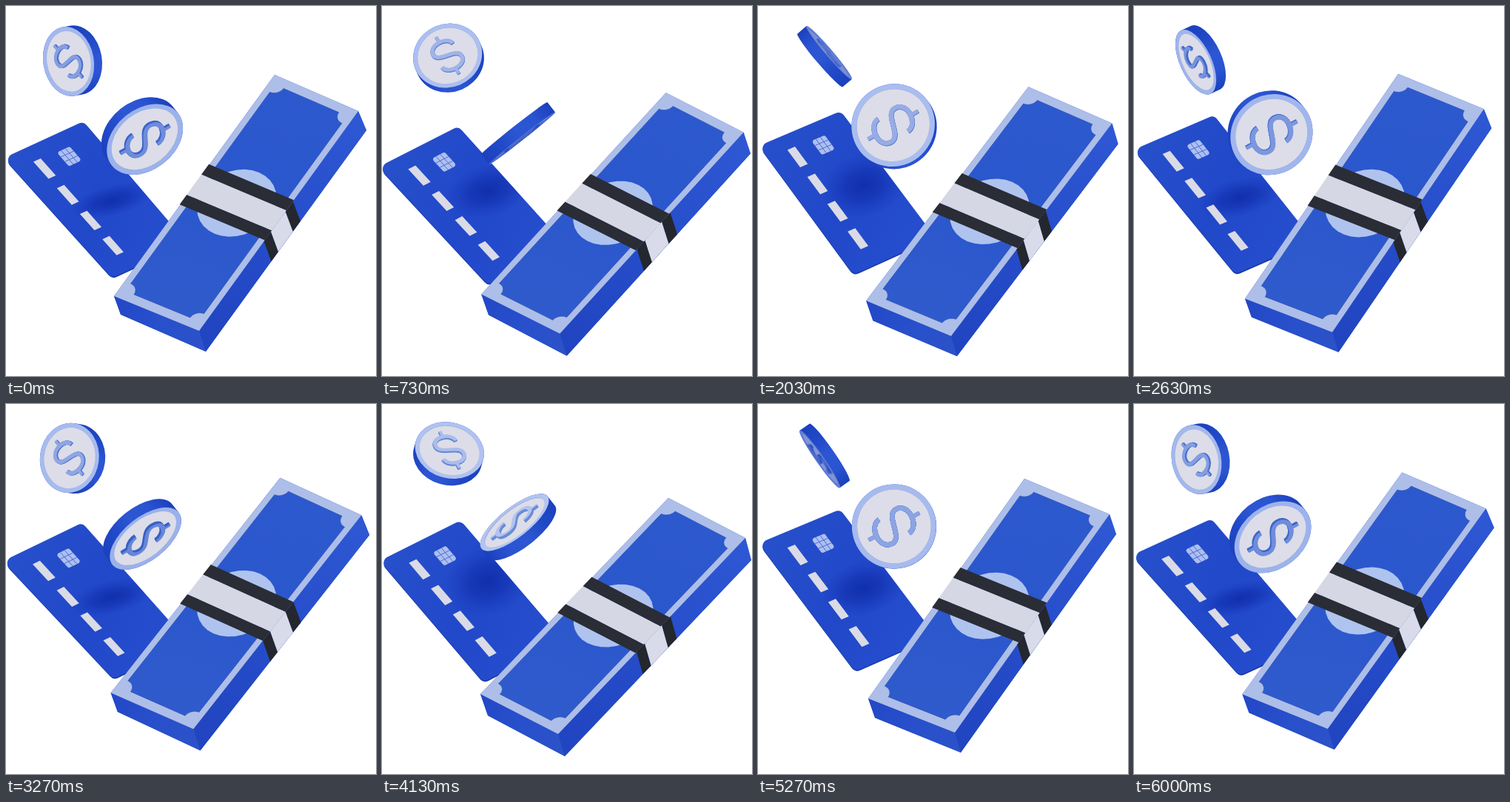
Animation of 500 by 500 pixels, one loop 6030 ms. Source, as an HTML page with a canvas:

```html
<!DOCTYPE html>
<html lang="en">
<head>
<meta charset="utf-8">
<title>Cash, card and coins</title>
<style>
  html, body { margin: 0; width: 100%; height: 100%; overflow: hidden; background: #fff; }
  canvas { display: block; width: 500px; height: 500px; }
</style>
</head>
<body>
<canvas id="stage" width="500" height="500"></canvas>
<script>
const ctx = document.getElementById('stage').getContext('2d');
const LOOP = 6030;
const HALF = LOOP / 2;
const TAU = Math.PI * 2;
const RAD = Math.PI / 180;

// Three poses of the sway; every other pose is a first-harmonic blend of them.
const POSE_AT = [0, 1115, 2255].map(ms => ms / HALF * TAU);

// Corner order: top, right, bottom, left, then the lower right, bottom, left.
const BILL = [
  [[363, 93], [476, 142], [261, 439], [146, 392], [487, 168], [270, 467], [155, 417]],
  [[387, 127], [491, 181], [238, 446], [133, 392], [499, 211], [247, 476], [143, 421]],
  [[360, 101], [475, 149], [266, 444], [149, 398], [484, 176], [274, 471], [158, 424]]
];
// Corner order: left, top, right, bottom.
const CARD = [
  [[-3, 206], [104.5, 156.5], [245, 321], [143, 368]],
  [[-3, 212.5], [106, 158], [245, 320], [137, 376.5]],
  [[1, 189], [111, 143], [240, 314], [131, 362]]
];

const COINS = [
  { x: 90, y: 70, bob: 4, lag: 0, R: 47.2, h: 16, axis: [.56, .72, .41],
    start: 37.5, dir: -1, roll: a => .07 - .2 * a },
  { x: 184, y: 168.7, bob: 7.5, lag: .42, R: 57, h: 17, axis: [.785, -.62, 0],
    start: 44, dir: 1, roll: a => .18 + .06 * a }
];

const DOLLAR = new Path2D(
  'M.31-.24C.28-.55-.34-.57-.34-.23C-.34.07.34-.07.34.23C.34.57-.28.55-.31.24');
const BAR = new Path2D('M0-.68V-.42M0 .42V.68');

function weights(angle) {
  return POSE_AT.map((own, i) => POSE_AT.reduce((w, other, j) =>
    i === j ? w : w * Math.sin((angle - other) / 2) / Math.sin((own - other) / 2), 1));
}

function blend(poses, w) {
  return poses[0].map((_, i) => [0, 1].map(k =>
    poses.reduce((sum, pose, n) => sum + w[n] * pose[i][k], 0)));
}

// Projective map from the unit square onto a quad.
function project([p0, p1, p2, p3]) {
  const dx1 = p1[0] - p2[0], dy1 = p1[1] - p2[1];
  const dx2 = p3[0] - p2[0], dy2 = p3[1] - p2[1];
  const sx = p0[0] - p1[0] + p2[0] - p3[0];
  const sy = p0[1] - p1[1] + p2[1] - p3[1];
  const det = dx1 * dy2 - dx2 * dy1;
  const g = (sx * dy2 - dx2 * sy) / det;
  const h = (dx1 * sy - sx * dy1) / det;
  return (u, v) => {
    const w = 1 + g * u + h * v;
    return [0, 1].map(k => (p0[k] + (p1[k] * (1 + g) - p0[k]) * u
      + (p3[k] * (1 + h) - p0[k]) * v) / w);
  };
}

function poly(points, fill) {
  ctx.beginPath();
  points.forEach(p => ctx.lineTo(p[0], p[1]));
  ctx.closePath();
  ctx.fillStyle = fill;
  ctx.fill();
}

function rect(map, u0, v0, u1, v1, fill) {
  poly([map(u0, v0), map(u1, v0), map(u1, v1), map(u0, v1)], fill);
}

function arc(map, u, v, ru, rv, from, to) {
  return Array.from({ length: 33 }, (_, i) => {
    const a = from + (to - from) * i / 32;
    return map(u + ru * Math.cos(a), v + rv * Math.sin(a));
  });
}

function gradient(from, to, colors) {
  const g = ctx.createLinearGradient(from[0], from[1], to[0], to[1]);
  colors.forEach((c, i) => g.addColorStop(i / (colors.length - 1), c));
  return g;
}

function roundedPath(points, r) {
  const n = points.length;
  const last = points[n - 1];
  ctx.beginPath();
  ctx.moveTo((last[0] + points[0][0]) / 2, (last[1] + points[0][1]) / 2);
  points.forEach((p, i) => ctx.arcTo(...p, ...points[(i + 1) % n], r));
  ctx.closePath();
}

function drawCard(w, angle) {
  const quad = blend(CARD, w);
  const map = project(quad);

  roundedPath(quad.map(p => [p[0] + .3, p[1] + 1]), 9);
  ctx.fillStyle = '#1a3aa8';
  ctx.fill();

  ctx.save();
  roundedPath(quad.map(p => [p[0], p[1] - .7]), 9);
  ctx.fillStyle = gradient(quad[0], quad[2], ['#2750cb', '#2148c9', '#264fce']);
  ctx.fill();
  ctx.clip();

  // Soft shadow of the large coin.
  ctx.translate(143, 249 + 14 * Math.cos(angle));
  ctx.rotate(-.25);
  ctx.scale(58, 36 - 15 * Math.cos(angle));
  const shade = ctx.createRadialGradient(0, 0, 0, 0, 0, 1);
  shade.addColorStop(0, 'rgba(12,40,165,.8)');
  shade.addColorStop(.45, 'rgba(14,44,170,.55)');
  shade.addColorStop(1, 'rgba(20,50,185,0)');
  ctx.fillStyle = shade;
  ctx.fillRect(-1, -1, 2, 2);
  ctx.restore();

  for (let i = 0; i < 4; i++) {
    const v = .095 + .213 * i;
    rect(map, .238, v, .33, v + .137, '#dadbe6');
  }

  const [u0, v0, u1, v1] = [.522, .103, .685, .214];
  roundedPath([map(u0, v0), map(u1, v0), map(u1, v1), map(u0, v1)], 3);
  ctx.fillStyle = '#adbff0';
  ctx.fill();
  ctx.beginPath();
  for (const s of [1 / 3, 2 / 3]) {
    const u = u0 + (u1 - u0) * s, v = v0 + (v1 - v0) * s;
    ctx.moveTo(...map(u, v0)); ctx.lineTo(...map(u, v1));
    ctx.moveTo(...map(u0, v)); ctx.lineTo(...map(u1, v));
  }
  ctx.strokeStyle = '#4a6bd0';
  ctx.lineWidth = 1;
  ctx.stroke();
}

function drawBill(w) {
  const [T, R, B, L, R2, B2, L2] = blend(BILL, w);
  const top = project([T, R, B, L]);
  const side = project([R, R2, B2, B]);

  poly([T, R, R2, B2, L2, L], '#2850ca');
  poly([L, B, B2, L2], gradient(L, B2, ['#2347c6', '#2850cb', '#2c52c8']));
  poly([R, R2, B2, B], gradient(R, B2, ['#2f58d4', '#264dca', '#2144c0']));
  poly([T, R, B, L], '#adbee8');

  // Panel with a scooped notch at each corner.
  const [pu, pv, ru, rv] = [.07, .034, .1, .033];
  const corners = [[pu, pv, 1], [1 - pu, pv, 2], [1 - pu, 1 - pv, 3], [pu, 1 - pv, 4]];
  const panel = corners.flatMap(([u, v, q]) =>
    arc(top, u, v, ru, rv, q * Math.PI / 2, (q - 1) * Math.PI / 2));
  poly(panel, gradient(T, B, ['#2d59ce', '#2b57cd', '#305bcc']));
  ctx.strokeStyle = '#2a4fb8';
  ctx.lineWidth = .8;
  ctx.stroke();
  poly(arc(top, .5, .5, .39, .139, 0, TAU), '#afc3ef');

  const bands = [[.406, .453, '#2a2d36', '#24272e'], [.544, .588, '#2a2d36', '#24272e'],
                 [.453, .544, '#d5d7e5', '#d9dbea']];
  for (const [from, to, face, edge] of bands) {
    rect(side, 0, from, 1, to, edge);
    rect(top, -.008, from, 1, to, face);
  }
}

function drawCoin(coin, phase, angle) {
  const { R, h, axis: a } = coin;
  const m = Math.hypot(a[0], a[1]);
  const e0 = [-a[2] * a[0] / m, -a[2] * a[1] / m, m];
  const e1 = [-a[1] / m, a[0] / m, 0];

  // Both faces are alike, so the visible one always lies within a half turn.
  const turn = coin.start + coin.dir * 180 * phase;
  const spin = ((turn + 90) % 180 + 180) % 180 - 90;
  const al = spin * RAD, c = Math.cos(al), s = Math.sin(al);
  const n = e0.map((v, k) => v * c + e1[k] * s);
  const b = e0.map((v, k) => e1[k] * c - v * s);
  const cx = coin.x, cy = coin.y + coin.bob * Math.cos(angle - coin.lag);
  const nz = Math.max(n[2], .01), tilt = Math.atan2(n[1], n[0]);
  const at = d => [cx + n[0] * d, cy + n[1] * d];
  const disc = (d, scale, fill) => {
    ctx.beginPath();
    ctx.ellipse(...at(d), R * nz * scale, R * scale, tilt, 0, TAU);
    ctx.fillStyle = fill;
    ctx.fill();
  };
  // Faces turned upwards catch more light.
  const up = .5 - n[1] / 2;
  const lit = ranges => `rgb(${ranges.map(([lo, hi]) => lo + (hi - lo) * up)})`;

  // Edge of the cylinder.
  const mx = -Math.sin(tilt) * R, my = Math.cos(tilt) * R;
  ctx.beginPath();
  ctx.ellipse(...at(-h / 2), R * nz, R, tilt, Math.PI / 2, Math.PI * 1.5);
  ctx.ellipse(...at(h / 2), R * nz, R, tilt, -Math.PI / 2, Math.PI / 2);
  ctx.closePath();
  ctx.fillStyle = gradient([cx + mx, cy + my], [cx - mx, cy - my],
    ['#1b41bd', '#2149c8', '#2c56d2', '#2b54d2', '#1b40bc']);
  ctx.fill();

  disc(h / 2, 1, lit([[148, 184], [172, 200], [234, 242]]));
  disc(h / 2, .875, '#9db0e2');
  ctx.save();
  ctx.clip();
  disc(h / 2 - R * .025, .875, '#dcdde8');

  // Raised symbol, stacked from its base to its top.
  const roll = coin.roll(al), cr = Math.cos(roll), sr = Math.sin(roll);
  const down = [0, 1].map(k => a[k] * cr + b[k] * sr);
  const right = [0, 1].map(k => a[k] * sr - b[k] * cr);
  const edgeInk = lit([[45, 115], [85, 148], [195, 220]]);
  const topInk = lit([[85, 195], [120, 207], [212, 241]]);
  for (let i = 0; i <= 4; i++) {
    ctx.save();
    ctx.transform(right[0] * R, right[1] * R, down[0] * R, down[1] * R,
      ...at(h / 2 + R * (i * .018 - .035)));
    ctx.strokeStyle = i < 4 ? edgeInk : topInk;
    ctx.lineWidth = .115;
    ctx.stroke(DOLLAR);
    ctx.lineWidth = .09;
    ctx.stroke(BAR);
    ctx.restore();
  }
  ctx.restore();

  const dim = Math.max(0, .35 - nz) * 2;
  if (dim) disc(h / 2, 1, `rgba(30,66,190,${dim})`);
}

function draw() {
  const phase = performance.now() % LOOP / HALF;
  const angle = phase * TAU;
  const w = weights(angle);
  ctx.fillStyle = '#fff';
  ctx.fillRect(0, 0, 500, 500);
  drawCard(w, angle);
  drawBill(w);
  COINS.forEach(coin => drawCoin(coin, phase, angle));
  requestAnimationFrame(draw);
}
draw();
</script>
</body>
</html>
```
